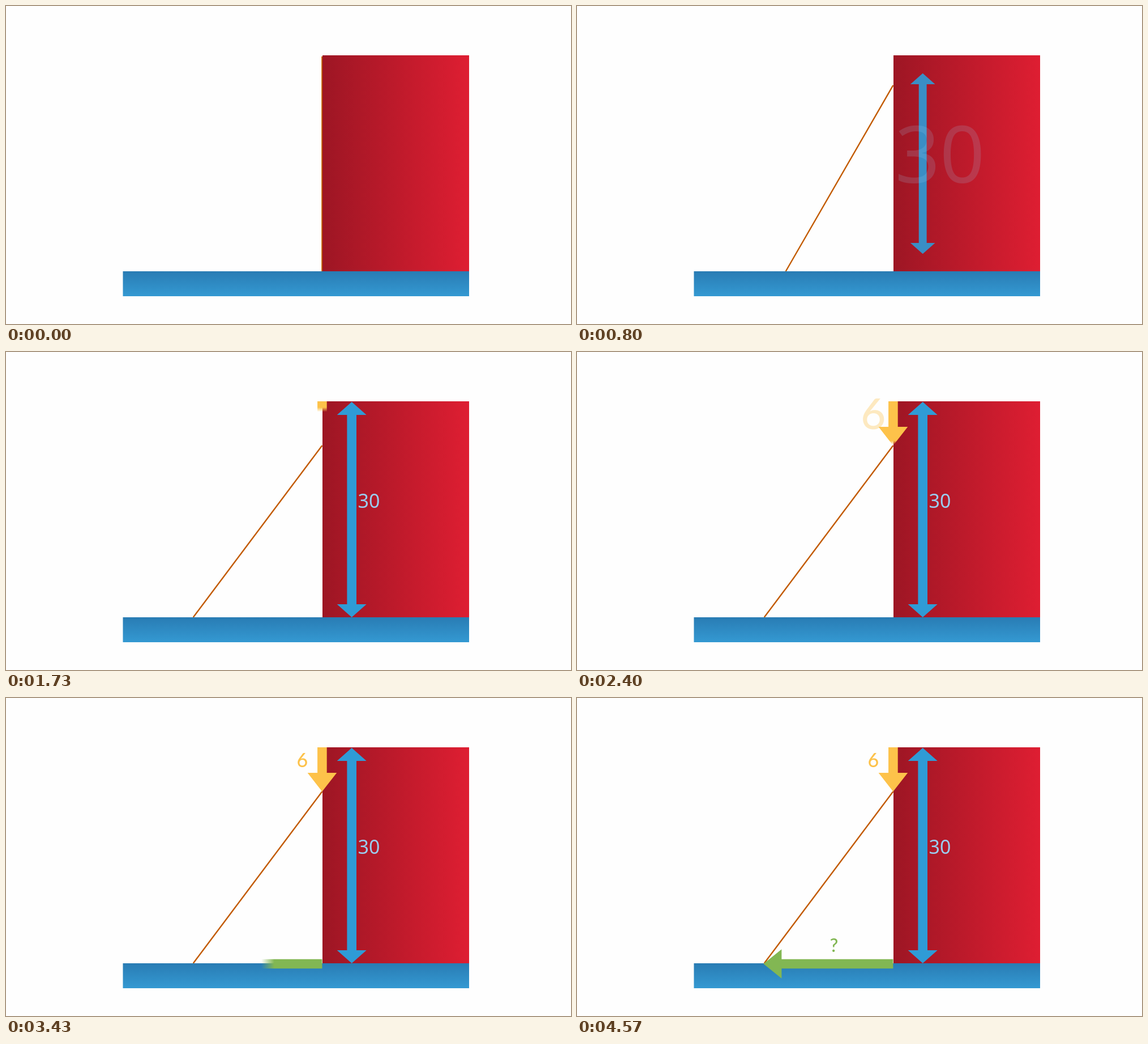
An HTML page with a canvas for the animation above (4610 ms loop, 998x561 px).

```html
<!DOCTYPE html>
<html lang="en">
<head>
<meta charset="utf-8">
<title>Sliding ladder</title>
<style>
  html, body { margin: 0; width: 100%; height: 100%; overflow: hidden; background: #fefefe; }
  canvas { display: block; }
</style>
</head>
<body>
<canvas id="stage" width="998" height="561"></canvas>
<script>
const ctx = document.getElementById('stage').getContext('2d');
const LOOP = 4610;
const WALL = 558.4, FLOOR = 468, LADDER = 379, DROP = 76;
const YELLOW = '253,194,74', GREEN = '130,183,83', BLUE = '47,155,214', PALE = '154,205,240';

const progress = (t, start, duration) => Math.min(1, Math.max(0, (t - start) / duration));

function gradient(x0, y0, x1, y1, from, to) {
  const g = ctx.createLinearGradient(x0, y0, x1, y1);
  g.addColorStop(0, from);
  g.addColorStop(1, to);
  return g;
}

function polygon(points) {
  ctx.beginPath();
  for (const [x, y] of points) ctx.lineTo(x, y);
  ctx.fill();
}

function drawLadder(t) {
  const height = LADDER - DROP * progress(t, 20, 1167);
  ctx.strokeStyle = '#c25a00';
  ctx.lineWidth = 2.4;
  ctx.beginPath();
  ctx.moveTo(WALL - Math.sqrt(LADDER ** 2 - height ** 2), FLOOR);
  ctx.lineTo(WALL, FLOOR - height);
  ctx.stroke();
}

function drawScene() {
  ctx.fillStyle = gradient(559, 0, 818, 0, '#9d1624', '#de1e32');
  ctx.fillRect(559, 87, 259, 381);
  ctx.fillStyle = gradient(0, 468, 0, 512, '#297cb4', '#3499d2');
  ctx.fillRect(206.5, 468, 611.5, 44);
}

// Double arrow growing from its centre, with a small overshoot at the end.
function drawHeightArrow(t) {
  const scale = t < 900
    ? Math.max(0, (t - 257) * 0.00154)
    : 1 + 0.09 * Math.sin(Math.PI * progress(t, 900, 190));
  if (!scale) return;
  ctx.save();
  ctx.globalAlpha = progress(t, 220, 640);
  ctx.translate(610.7, 278);
  ctx.scale(scale, scale);
  ctx.fillStyle = `rgb(${BLUE})`;
  polygon([
    [0, -190], [26, -167], [8.3, -167], [8.3, 167], [26, 167],
    [0, 190], [-26, 167], [-8.3, 167], [-8.3, -167], [-26, -167]
  ]);
  ctx.restore();
}

// Single arrow revealed from tail to tip behind a soft edge.
function wipeArrow(u, color, x, y, angle, length, head) {
  ctx.save();
  ctx.translate(x, y);
  ctx.rotate(angle);
  const front = u * 1.1 * length, neck = length - head;
  ctx.fillStyle = gradient(front - 0.1 * length, 0, front, 0, `rgb(${color})`, `rgba(${color},0)`);
  polygon([
    [0, -8.3], [neck, -8.3], [neck, -25.8], [length, 0],
    [neck, 25.8], [neck, 8.3], [0, 8.3]
  ]);
  ctx.restore();
}

// Label that shrinks into place while fading in.
function drawLabel(u, text, color, font, x, y) {
  if (!u) return;
  const scale = 1 + 6.5 * (1 - u) ** 4;
  ctx.save();
  ctx.globalAlpha = u;
  ctx.translate(x, y);
  ctx.scale(scale, scale);
  ctx.font = font;
  ctx.textAlign = 'center';
  ctx.fillStyle = `rgb(${color})`;
  ctx.fillText(text, 0, 12);
  ctx.restore();
}

function draw(t) {
  ctx.fillStyle = '#fefefe';
  ctx.fillRect(0, 0, 998, 561);
  drawLadder(t);
  drawScene();
  drawHeightArrow(t);
  wipeArrow(progress(t, 1520, 980), YELLOW, 558.4, 87, Math.PI / 2, 78, 33);
  wipeArrow(progress(t, 3013, 980), GREEN, 558.4, 469, Math.PI, 229, 32);
  drawLabel(progress(t, 685, 680), '30', PALE, '34px "Noto Sans", sans-serif', 641, 263.2);
  drawLabel(progress(t, 2170, 680), '6', YELLOW, '500 34px Lato, sans-serif', 523.4, 109.6);
  drawLabel(progress(t, 3660, 680), '?', GREEN, '500 33px Lato, sans-serif', 454, 436);
}

const begin = performance.now();
function tick() {
  draw((performance.now() - begin) % LOOP);
  requestAnimationFrame(tick);
}
tick();
</script>
</body>
</html>
```
